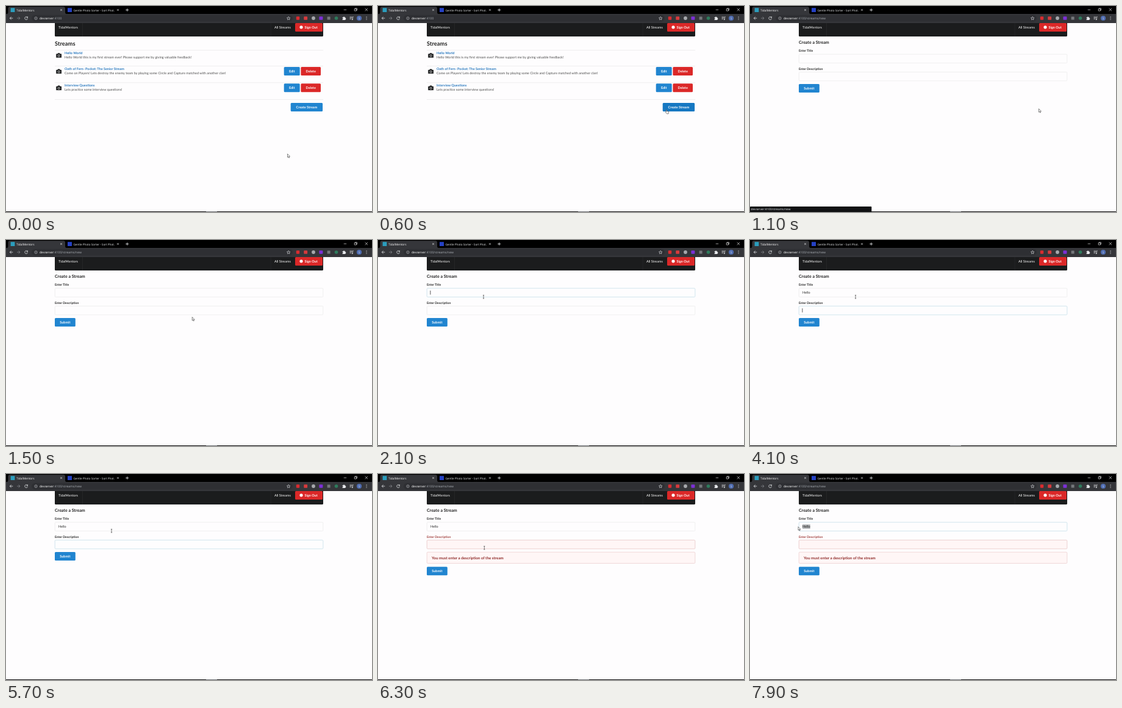
An HTML page that plays this animation: 600x338 px, repeating every 8000 ms.

```html
<!DOCTYPE html>
<html lang="en">
<head>
<meta charset="utf-8">
<title>Stream form demo</title>
<style>
html, body { margin: 0; width: 100%; height: 100%; overflow: hidden; background: #fefdfe; }
svg { display: block; width: 100vw; height: 100vh; }
text { font-family: Lato, sans-serif; text-rendering: geometricPrecision; white-space: pre; }
.ui { font-family: "Open Sans", sans-serif; }
.b { font-weight: 700; }
.mid { text-anchor: middle; }
</style>
</head>
<body>
<svg id="stage" viewBox="0 0 600 338">
  <rect width="600" height="338" fill="#fefdfe"/>
  <g id="menu"></g>
  <g id="list"></g>
  <g id="form"></g>
  <g id="chrome"></g>
  <g id="status"></g>
  <g id="cursor">
    <path id="arrow" d="M0 0V5.6L1.3 4.5L2.2 6.5L3.1 6.1L2.2 4.2H4Z" fill="#fff" stroke="#222" stroke-width=".55"/>
    <path id="hand" d="M.1 .5Q.7 -.3 1.2 .5V2.6L4 3.2Q4.6 3.4 4.5 4.2L3.9 7H1.2L-.9 4.6Q-.9 3.8 .1 4.3Z" fill="#fff" stroke="#222" stroke-width=".55"/>
    <path id="beam" d="M-1.1 -2.7H1.1M0 -2.7V2.7M-1.1 2.7H1.1" fill="none" stroke="#222" stroke-width=".6"/>
  </g>
</svg>
<script>
const LOOP = 8000, NS = "http://www.w3.org/2000/svg";
const BLUE = "#2185d0", RED = "#db2828", INK = "#1b1c1d", PAGE = "#fefdfe";
const LINE = "#dedede", EDGE = "#e6e6e6", GLOW = "#b2d5e3";
const HOST = "devserver", PORT = ":4100", PATH = "/streams/new", BRAND = "TidalMentors";
const $ = id => document.getElementById(id);

function add(parent, tag, attrs, content) {
  const el = document.createElementNS(NS, tag);
  for (const k in attrs) el.setAttribute(k, attrs[k]);
  if (content !== undefined) el.textContent = content;
  parent.appendChild(el);
  return el;
}
const rect = (p, x, y, width, height, fill, rx = 0, more = {}) =>
  add(p, "rect", { x, y, width, height, fill, rx, ...more });
const circle = (p, cx, cy, r, fill, more = {}) => add(p, "circle", { cx, cy, r, fill, ...more });
const stroke = (p, d, color, width = .7) =>
  add(p, "path", { d, fill: "none", stroke: color, "stroke-width": width });
const text = (p, x, y, s, size, fill, cls = "") =>
  add(p, "text", { x, y, "font-size": size, fill, class: cls }, s);
const field = (p, y, h = 14.4) =>
  rect(p, 80.2, y, 439.6, h, PAGE, 1.5, { stroke: EDGE, "stroke-width": .6 });
const show = (el, on) => el.setAttribute("display", on ? "inline" : "none");

function button(p, x, y, w, label, color) {
  const g = add(p, "g", {});
  const box = rect(g, x, y, w, 14, color, 1.5);
  text(g, x + w / 2, y + 9, label, 5.47, "#fff", "b mid");
  return { g, box };
}

function buildChrome() {
  const g = $("chrome"), pale = "#e4e6e9";
  rect(g, 0, 0, 600, 13.5, "#000");
  rect(g, 0, 13, 600, 15, "#35363a");
  add(g, "path", { d: "M1 13.2Q3.5 13 3.5 10V4Q3.5 1.2 6.5 1.2H94Q97 1.2 97 4V10Q97 13 99.5 13.2Z", fill: "#35363a" });
  rect(g, 7.6, 3.2, 6.8, 6.8, "#2b9dbd");
  rect(g, 101, 3.2, 7, 6.8, "#2541c4");
  text(g, 17, 8.5, BRAND, 4.8, "#fff", "ui");
  text(g, 110.5, 8.5, "Gentle Photo Sorter - Sort Phot.", 4.6, "#eceef0", "ui");
  for (const x of [90.5, 183.5])
    stroke(g, `M${x - 1.5} 5l3 3m0 -3l-3 3`, pale);
  stroke(g, "M196.2 6.5h5M198.7 4v5", pale, .8);
  stroke(g, "M553.7 6.2h4.4M571.2 4.8h3.2v3.2h-3.2zM572.2 4.8v-1h3.2v3.2h-1M588.6 3.8l4.4 4.4m0 -4.4l-4.4 4.4", "#fff", .6);

  stroke(g, "M11.3 20H6.4M8.7 17.6L6.3 20L8.7 22.4", pale, .8);
  stroke(g, "M18 20h4.9M20.6 17.6L23 20L20.6 22.4", "#85878b", .8);
  stroke(g, "M35 18.5A2.4 2.4 0 1 0 35.5 20.6M35.5 17.3V19.2H33.5", pale, .8);
  rect(g, 42, 14.8, 428, 10.6, "#2e2f33", 5.3);
  circle(g, 49, 20.1, 2.2, "none", { stroke: "#c4c7ca", "stroke-width": .6 });
  stroke(g, "M49 19.7v1.6M49 18.6v.5", "#c4c7ca", .6);
  const url = text(g, 55, 22, "", 5.1, "#a9aeb4", "ui");
  add(url, "tspan", { fill: "#fff" }, HOST);
  add(url, "tspan", {}, PORT);
  const tail = add(url, "tspan", {}, "");

  stroke(g, "M463.2 17.4l.8 1.8l2 .2l-1.5 1.3l.4 2l-1.7 -1l-1.7 1l.4 -2l-1.5 -1.3l2 -.2z", pale, .6);
  rect(g, 475.8, 17.2, 5.4, 5.6, "#d92b2f", 1);
  rect(g, 488.3, 17.2, 5.8, 5.6, "#d83a3c", .8);
  circle(g, 504, 20, 2.9, "#a6a8ac");
  rect(g, 513.4, 17.2, 6, 5.6, "#7c2fd6", 1);
  rect(g, 526.6, 17.4, 5, 5.2, "#74777b", .5);
  circle(g, 541.5, 20, 2.8, "#2d7b5c");
  add(g, "path", { d: "M551.5 18.4h1.5a1 1 0 1 1 2 0h1.4v1.5a1 1 0 1 1 0 2v1.2h-4.9v-1.3a1 1 0 1 0 0 -2z", fill: "#e8eaed" });
  stroke(g, "M563.5 18h4M563.5 19.7h4M563.5 21.4h2.4M568.3 22.2v-4.4h1.4", pale);
  circle(g, 567.7, 22.1, .9, pale);
  circle(g, 579, 20, 4.1, "#4f6cb0");
  text(g, 579, 21.7, "S", 4.8, "#dce5f7", "ui mid");
  for (const y of [17.9, 20, 22.1]) circle(g, 591, y, .6, pale);

  rect(g, 0, 337, 600, 1, "#0b0b0b");
  rect(g, 328, 337, 18, 1, "#6a6d71");
  return tail;
}

function buildMenu() {
  const g = $("menu");
  rect(g, 80, 22, 440, 28, INK, 1.6);
  for (const x of [125.4, 433.8]) rect(g, x, 28, .5, 22, "#303132");
  text(g, 86, 37.4, BRAND, 5.47, "#fff");
  text(g, 440, 37.4, "All Streams", 5.47, "#fff");
  rect(g, 474, 28, 45, 14, RED, 1.5);
  circle(g, 484, 34.8, 2.6, "#fff");
  text(g, 489.5, 36.8, "Sign Out", 5.47, "#fff", "b");
}

function buildList() {
  const g = $("list");
  const rows = [
    [72.5, "Hello World", "Hello World this is my first stream ever! Please support me by giving valuable feedback!"],
    [98.8, "Oath of Fern- Pocket: The Senior Stream", "Come on Players! Lets destroy the enemy team by playing some Circle and Capture matched with another clan!"],
    [125.9, "Interview Questions", "Lets practice some interview questions!"]
  ];
  text(g, 80, 65, "Streams", 9.4, "#222", "b");
  rows.forEach(([y, title, note], i) => {
    const up = i ? 0 : .3;
    rect(g, 80, y - .25, 440, .5, LINE);
    text(g, 96, y + 6.4 + up, title, 5.47, "#2878be", "b");
    text(g, 96, y + 12.9 + up, note, 5.47, "#4a4a4a");
    const c = y + 8.5;
    add(g, "path", { d: `M82.4 ${c - 2.3}h2l.8 -1.3h2.8l.8 1.3h2v5.8h-8.4z`, fill: INK, stroke: INK, "stroke-width": .4, "stroke-linejoin": "round" });
    circle(g, 86.6, c + .5, 1.6, "none", { stroke: "#fff", "stroke-width": .7 });
    if (i) {
      button(g, 455.7, y + 1.3, 26, "Edit", BLUE);
      button(g, 483.4, y + 1.3, 32.6, "Delete", RED);
    }
  });
  rect(g, 80, 153.1, 440, .5, LINE);
  return button(g, 466.7, 159, 52.4, "Create Stream", BLUE);
}

function buildForm() {
  const g = $("form"), f = {};
  text(g, 80, 62, "Create a Stream", 7, "#222", "b");
  text(g, 80, 75.2, "Enter Title", 5.05, "#222", "b");
  f.title = field(g, 79.2);
  f.label = text(g, 80, 104.5, "Enter Description", 5.05, "#222", "b");
  f.desc = field(g, 108.4);
  f.select = rect(g, 86, 82.8, 0, 7, "#aeb0b2");
  f.value = text(g, 86, 88.2, "", 5.47, "#222");
  f.caret = rect(g, 85.6, 83, .65, 6.6, "#000");
  f.alert = add(g, "g", {});
  rect(f.alert, 80.2, 128.2, 439.6, 18.4, "#fff6f6", 1.5, { stroke: "#e0b4b4", "stroke-width": .5 });
  text(f.alert, 88, 140, "You must enter a description of the stream", 6.25, "#912d2b", "b");
  f.submit = button(g, 80, 128, 33.8, "Submit", BLUE).g;
  return f;
}

buildMenu();
const tail = buildChrome(), create = buildList(), form = buildForm();
rect($("status"), 0, 329, 199.3, 9, "#111214", 1);
text($("status"), 1.5, 335.2, HOST + PORT + PATH, 4.8, "#eceef0", "ui");

// Times in ms
const OPEN = 1000, FOCUS = 1900, NEXT = 4100, BLUR = 6000, DRAG = 7500;
const keys = [2500, 2900, 3100, 3200, 3500];
const route = [
  [100, 461.5, 242.7], [600, 472.2, 169.8], [900, 473.4, 168.6], [1150, 473.4, 168.6],
  [1800, 173, 93.3], [5700, 173, 93.3], [5950, 176, 151], [6050, 176, 151],
  [6300, 174.3, 121.2], [6500, 172, 110], [7400, 102, 86.6], [DRAG, 102, 86.6], [7750, 79, 86.6]
];

function pointer(t) {
  const i = route.findIndex(k => k[0] > t);
  if (i === 0) return route[0].slice(1);
  if (i < 0) return route[route.length - 1].slice(1);
  const [t0, x0, y0] = route[i - 1], [t1, x1, y1] = route[i];
  const u = (t - t0) / (t1 - t0), e = u * u * (3 - 2 * u);
  return [x0 + (x1 - x0) * e, y0 + (y1 - y0) * e];
}

function outline(el, color, fill) {
  el.setAttribute("stroke", color);
  el.setAttribute("fill", fill);
}

function updateForm(t, x) {
  const typed = "Hello".slice(0, keys.filter(k => t >= k).length);
  const bad = t >= BLUR;
  form.value.textContent = typed;
  const onTitle = (t >= FOCUS && t < NEXT) || t >= DRAG;
  const onDesc = t >= NEXT && t < BLUR;
  outline(form.title, onTitle ? GLOW : EDGE, PAGE);
  outline(form.desc, bad ? "#e0b4b4" : onDesc ? GLOW : EDGE, bad ? "#fff6f6" : PAGE);
  form.label.setAttribute("fill", bad ? "#9f3a38" : "#222");
  show(form.alert, bad);
  form.submit.setAttribute("transform", `translate(0 ${bad ? 24.2 : 0})`);

  const blink = Math.floor((t - NEXT) / 500) % 2 === 0;
  show(form.caret, (t >= FOCUS + 100 && t < NEXT) || (onDesc && blink));
  form.caret.setAttribute("x", 85.6 + (onDesc || !typed ? 0 : form.value.getComputedTextLength()));
  form.caret.setAttribute("y", onDesc ? 112.2 : 83);

  // Selection snaps to whole letters, from the end back to the pointer
  let width = 0;
  if (t >= DRAG) {
    const end = 86 + form.value.getComputedTextLength();
    for (let i = 0; i < typed.length; i++) {
      const from = form.value.getStartPositionOfChar(i).x;
      if (from + 1 >= x) {
        form.select.setAttribute("x", from);
        width = end - from;
        break;
      }
    }
  }
  form.select.setAttribute("width", width);
}

function update(t) {
  const [x, y] = pointer(t), open = t >= OPEN;
  show($("list"), !open);
  show($("form"), open);
  show($("status"), open && t < 1500);
  tail.textContent = open ? PATH : "";
  const hover = !open && x > 466.7 && y > 159 && y < 173;
  create.box.setAttribute("fill", hover ? "#1678c2" : BLUE);
  if (open) updateForm(t, x);

  const inField = open && x > 80 && x < 520 && ((y > 79 && y < 94) || (y > 108 && y < 123));
  show($("arrow"), !hover && !inField);
  show($("hand"), hover);
  show($("beam"), inField);
  $("cursor").setAttribute("transform", `translate(${x} ${y})`);
}

const start = performance.now();
function tick() {
  update((performance.now() - start) % LOOP);
  requestAnimationFrame(tick);
}
tick();
</script>
</body>
</html>
```
